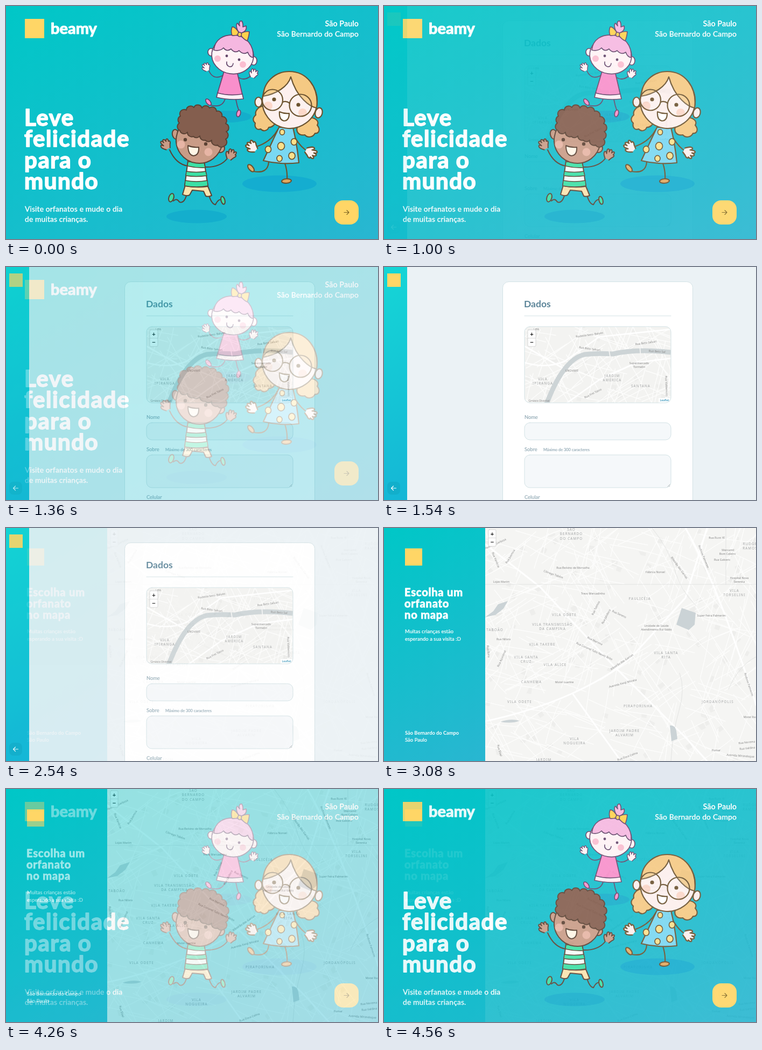
Recreate the animation shown at these times as an HTML page. Size 691x434 px, loop 4.62 s.

```html
<!DOCTYPE html>
<html lang="pt-BR">
<head>
<meta charset="utf-8">
<title>Orfanatos</title>
<style>
html, body { margin: 0; width: 100%; height: 100%; overflow: hidden; background: #14bfcb; }
.scene, .side { position: absolute; top: 0; left: 0; width: 691px; height: 434px; overflow: hidden; }
svg { position: absolute; top: 0; left: 0; fill: none; stroke-linecap: round; stroke-linejoin: round; }
text { font-family: Lato, "Open Sans", sans-serif; stroke: none; white-space: pre; }
.head { font-weight: 700; letter-spacing: .037em; fill: #fff; stroke: #fff; stroke-width: .042em; }
.body { letter-spacing: .012em; fill: #fff; stroke: #fff; stroke-width: .025em; }
.bold { font-weight: 700; fill: #fff; }
.label { fill: #8fa7b3; stroke: #8fa7b3; stroke-width: .15px; }
.road { font: 500 5.3px "Noto Sans", sans-serif; fill: #858585; text-anchor: middle; }
.area { font: 6.3px "Noto Sans", sans-serif; letter-spacing: 1.1px; fill: #a5a7a8; text-anchor: middle; }
.zoom { font: 700 11px "Liberation Sans", sans-serif; fill: #222; text-anchor: middle; }
#home, .wide { background: linear-gradient(329.54deg, #29b6d1 0%, #00c7c7 100%); }
#form { background: #ebf2f5; opacity: 0; }
#map { background: #f5f5f3; opacity: 0; }
.wide { width: 188px; }
.slim { width: 43px; background: linear-gradient(329.54deg, #15b6d6 0%, #15d6d6 100%); }
</style>
</head>
<body>
<div class="scene" id="home"></div>
<div class="scene" id="form"></div>
<div class="scene" id="map"></div>
<script>
const STEP = 60, LOOP = 4620;
const byId = id => document.getElementById(id);
const svg = body => `<svg width="691" height="434" viewBox="0 0 691 434">${body}</svg>`;
const text = (cls, x, y, size, str, extra = '') =>
  `<text class="${cls}" x="${x}" y="${y}" font-size="${size}" ${extra}>${str}</text>`;
const lines = (cls, x, y, size, gap, rows, extra) =>
  rows.map((row, i) => text(cls, x, y + i * gap, size, row, extra)).join('');
const path = (d, fill = 'none', extra = '') => `<path d="${d}" fill="${fill}" ${extra}/>`;
const oval = (x, y, rx, ry, fill, turn = 0, extra = '') =>
  `<ellipse cx="${x}" cy="${y}" rx="${rx}" ry="${ry}" fill="${fill}" transform="rotate(${turn} ${x} ${y})" ${extra}/>`;
const dot = (x, y, r, fill) => oval(x, y, r, r, fill, 0, 'stroke="none"');
const box = (x, y, w, h, rx, fill, extra = '') =>
  `<rect x="${x}" y="${y}" width="${w}" height="${h}" rx="${rx}" fill="${fill}" ${extra}/>`;
const group = (stroke, width, body) => `<g stroke="${stroke}" stroke-width="${width}">${body}</g>`;
const hand = (x, y, turn, scale, fill) => path(
  'M-4 9C-7 6-10 3-10 0C-10-4-7-3-5 0L-7-6C-7-11-3-10-2-5C-3-12 2-12 3-5C5-11 9-9 7-3C10-4 10 0 7 3L4 9', fill,
  `transform="translate(${x} ${y}) rotate(${turn}) scale(${scale})"`);

// Closed outline that bulges outwards between the points of a clockwise list.
const curls = list => {
  const pts = list.split(' ');
  return `M${pts[pts.length - 1]}` + pts.map(p => `A8 8 0 0 1 ${p}`).join('') + 'Z';
};

function randomizer(seed) {
  return (lo, hi) => {
    seed = (seed * 16807) % 2147483647;
    return lo + (hi - lo) * seed / 2147483647;
  };
}

function pinkGirl() {
  const skin = '#fff3f6', blush = '#fbbdd0', ink = '#64466b', hair = '#f5b7e0';
  return oval(411, 206, 45, 11, '#14aecb') + group(ink, 1.7,
    path('M405 128Q386 140 377 121M428 130Q441 142 455 130M407 173Q402 190 381 185M427 174Q429 186 433 196') +
    hand(372, 114, -24, .8, skin) + hand(460, 126, 18, .85, skin) +
    oval(376, 179, 3.6, 7, '#f98fcb', -38) + oval(432, 200, 3.5, 6.5, '#f98fcb', 15) +
    path('M405 122L393 162Q415 169 439 165L429 122Z', '#f98fcb') +
    path('M393 162Q415 168 439 164L441 173Q415 176 391 170Z', '#fff0f6') +
    oval(381, 86, 6, 7, skin) + oval(460, 102, 6, 8, skin) +
    oval(421, 92, 39, 34.5, skin, 8) +
    path('M386 82C388 62 404 53 424 54C447 56 461 74 459 96Q452 95 449 86Q441 92 433 83Q425 89 418 80Q410 86 404 78Q397 85 386 82Z', hair) +
    path('M435 51C427 45 427 33 430 32L434 37C432 30 435 27 438 28Q441 33 440 39L446 37C448 45 442 49 435 51Z', hair) +
    path('M434 52Q426 38 420 39Q417 47 420 55Q427 56 434 52Q446 46 452 48Q451 58 448 65Q441 62 434 52Z', '#ffd24d') +
    oval(434, 53, 3.5, 4, '#ffd24d') +
    dot(393, 98, 6, blush) + dot(440, 109, 6, blush) + dot(410, 93, 2.4, ink) + dot(433, 100, 2.4, ink) +
    path('M410 104Q409 111 415 113Q421 114 422 107'));
}

function blondeGirl() {
  const skin = '#fdf0ee', hair = '#f5c983', blush = '#fbd2c0', ink = '#6b5330', yolk = '#fde08a';
  const spots = [[513, 235, 4.5], [511, 261, 6.5], [535, 253, 5.5], [487, 267, 5.5], [531, 279, 6], [508, 284, 5]];
  return oval(508, 331, 69, 15.5, '#14add0') + group(ink, 2.2,
    path('M505 230Q493 252 468 261M533 237Q541 256 556 268M488 291Q486 313 460 308M518 293Q523 308 522 322') +
    hand(457, 262, -48, 1.1, skin) + hand(566, 273, 118, 1.1, skin) +
    oval(455, 302, 4, 8, '#e6b167', -40) + oval(521, 326, 9, 4, '#e2a85e', -4) +
    path('M507 226Q492 258 478 288Q510 296 544 292Q541 260 533 226Z', '#79d8f2') +
    spots.map(([x, y, r]) => oval(x, y, r, r + .6, yolk, 0, 'stroke-width="1.7"')).join('') +
    path('M478 186C468 188 462 196 464 203C458 208 458 214 463 218C461 226 466 232 473 229C478 235 486 232 488 226Q497 226 501 216L486 196Z', hair) +
    path('M566 208C577 209 582 216 578 222C585 230 581 238 574 237C570 245 560 246 555 240Q545 242 541 234Q538 226 545 222Z', hair) +
    oval(469, 179, 6.5, 9, skin) + oval(581, 199, 6.5, 9.5, skin, 15) +
    oval(527, 177, 51, 51, skin, 8) +
    path('M478 168C478 142 500 122 526 122C558 122 582 150 577 190C566 188 540 172 529 132C524 150 502 164 478 168Z', hair) +
    dot(487, 186, 8, blush) + dot(551, 199, 8, blush) +
    oval(495, 175, 19, 19.5, '#fff2') + oval(547, 185, 20.5, 20.5, '#fff2') + path('M514 179Q520 176 527 181') +
    dot(498, 174, 3.6, ink) + dot(543, 184, 3.6, ink) +
    path('M508 197Q517 201 526 200Q526 214 516 214Q507 212 508 197Z', '#fff'));
}

function boy() {
  const skin = '#c99c87', green = '#3be0a5', ink = '#5b4234';
  const hair = curls('323,232 322,218 324,205 335,194 349,189 364,190 378,190 391,196 401,206 408,219 ' +
    '409,234 408,248 405,261 393,259 382,250 370,250 360,242 348,243 337,235');
  return oval(354, 392, 56, 12.5, '#14aecd') + group(ink, 2,
    path('M338 298Q316 295 304 268M369 300Q398 301 411 284M336 350Q331 369 322 365Q317 357 311 363M377 353Q382 369 389 370Q395 358 401 361') +
    hand(297, 258, -28, 1, skin) + hand(418, 277, 26, 1, skin) +
    oval(307, 357, 4.5, 8, green, 18) + oval(403, 362, 3.5, 7.5, green, -15) +
    path('M333 334L328 351Q335 355 341 352L346 343L367 345L371 354Q376 356 382 353L375 336Z', '#fbe4ae') +
    path('M338 288L332 335Q354 339 375 336L368 288Z', '#f4fff9') +
    path('M338 290L368 292L370 301Q353 302 337 298ZM335 308Q354 311 371 308L373 316Q353 319 334 316ZM333 325Q354 329 374 325L375 335Q354 339 332 335Z', green, 'stroke-width="1.4"') +
    oval(315, 239, 6, 9, skin, -12) + oval(398, 265, 8, 8, skin) +
    oval(359, 250, 43, 43, skin, 8) + path(hair, '#845e4e') +
    dot(325, 258, 7.5, '#e7b5a5') + dot(376, 272, 7.5, '#e7b5a5') +
    dot(333, 249, 3.2, ink) + dot(371, 257, 3.2, ink) +
    path('M338 260Q347 264 358 263Q359 278 348 279Q338 277 338 260Z', '#fff6e6'));
}

const arrow = (x, y, dir, color) => group(color, 1.1,
  path(`M${x - 4.5 * dir} ${y}H${x + 4.5 * dir}M${x + .5 * dir} ${y - 4}L${x + 4.5 * dir} ${y}L${x + .5 * dir} ${y + 4}`));
const zoom = (x, y, w, h) => box(x, y, w, h, 2, '#fff', 'stroke="#ccc" stroke-width=".8"') +
  path(`M${x} ${y + h / 2}h${w}`, 'none', 'stroke="#ccc" stroke-width=".7"') +
  text('zoom', x + w / 2, y + h / 4 + 4, 11, '+') + text('zoom', x + w / 2, y + h * .75 + 4, 11, '−');
const roads = rows => rows.map(([x, y, str, turn = 0]) =>
  text('road', x, y, 5.3, str, `transform="rotate(${turn} ${x} ${y})"`)).join('');
const areas = rows => rows.map(([x, y, str]) => lines('area', x, y, 6.3, 8.4, str.split('|'))).join('');

// Faint blocks and streets, tilted along a few directions.
function streets(seed, count, x0, y0, x1, y1) {
  const rnd = randomizer(seed);
  let blocks = '', ways = '';
  for (let i = 0; i < count; i++) {
    const x = rnd(x0, x1), y = rnd(y0, y1), turn = [-32, 58, 18, -72][i % 4] + rnd(-10, 10);
    const spin = `transform="translate(${x.toFixed(1)} ${y.toFixed(1)}) rotate(${turn.toFixed(1)})"`;
    if (i % 3 === 0) blocks += path(`M0 0h${rnd(5, 15).toFixed(1)}v${rnd(4, 12).toFixed(1)}h-9z`, '#eeeeec', spin);
    ways += path(`M-${rnd(20, 60).toFixed(1)} 0Q0 ${rnd(-5, 5).toFixed(1)} ${rnd(20, 60).toFixed(1)} 0`, 'none', spin);
  }
  return blocks + group('#fdfdfc', 1.4, ways);
}

byId('home').innerHTML = svg(
  box(35, 24, 36, 36, 0, '#ffd666') + text('head', 83, 52, 29, 'beamy', 'style="letter-spacing:0"') +
  text('bold', 655, 38, 14.3, 'São Paulo', 'text-anchor="end"') +
  text('body', 655, 57, 13.9, 'São Bernardo do Campo', 'text-anchor="end"') +
  pinkGirl() + blondeGirl() + boy() +
  lines('head', 34, 223, 42, 39.4, ['Leve', 'felicidade', 'para o', 'mundo']) +
  lines('body', 35, 383, 13.8, 19, ['Visite orfanatos e mude o dia', 'de muitas crianças.']) +
  box(610, 362, 45, 45, 16, '#ffd666') + arrow(632.5, 384.5, 1, '#7d6423'));

const field = (y, h) => box(261, y, 272, h, 10, '#f5f8fa', 'stroke="#d3e2e5"');
const river = 'M300 260Q318 212 335 191Q352 168 372 163Q395 160 425 162Q470 152 533 159';
byId('form').innerHTML = '<div class="side slim"></div>' + svg(
  box(6, 12, 25, 25, 0, '#ffd666') + box(6, 400, 24, 24, 8, '#12afcb') + arrow(18, 412, -1, '#fff') +
  box(220.5, 27.5, 353, 430, 11, '#fff', 'stroke="#d3e2e5"') +
  text('bold', 260, 75, 17.5, 'Dados', 'style="fill:#5c8599"') +
  path('M261 91H533', 'none', 'stroke="#d3e2e5"') +
  '<clipPath id="frame"><rect x="261" y="111" width="272" height="142" rx="10"/></clipPath><g clip-path="url(#frame)">' +
  box(261, 111, 272, 142, 0, '#f3f3f1') + streets(77, 90, 261, 111, 533, 253) +
  group('#fff', 2.6, path('M261 178Q300 190 335 176L400 130L533 116M340 253L400 210L470 178L533 170M262 148L335 190')) +
  path(river, 'none', 'stroke="#cdd4d6" stroke-width="9" stroke-linecap="butt"') +
  group('#f7f7f6', 1.6, path('M417 150L421 172M475 146L477 168')) +
  areas([[295, 211, 'VILA|IPIRANGA'], [424, 205, 'JARDIM|AMÉRICA'], [477, 224, 'SANTANA']]) +
  roads([[283, 118, 'UPA'], [382, 128, 'Rodovia Neto Balvim', -8], [382, 154, 'Rua Beto Salvari', 8],
    [487, 143, 'Rua Beto Salvari', -8], [507, 159, 'Rua Beto Sal', 4], [349, 195, 'UNOVARE'],
    [474, 181, 'Supermercado'], [474, 188, 'Tormelin'], [389, 237, 'Rua Frei Tasco', -27],
    [288, 251, 'Ginásio Distrital'], [523, 222, 'Rua Valdemires', 88]]) +
  box(510, 244, 23, 9, 0, '#fff') + text('road', 521, 250, 5.3, 'Leaflet', 'style="fill:#0078a8"') +
  zoom(267, 117, 15, 31) + '</g>' +
  box(261, 111, 272, 142, 10, 'none', 'stroke="#d3e2e5"') +
  text('label', 261, 283, 9.3, 'Nome') + field(290, 32) +
  text('label', 261, 343, 9.3, 'Sobre') + text('label', 296, 343, 7.4, 'Máximo de 300 caracteres') + field(350, 61) +
  path('M527 409L531 405M530 409L531 408', 'none', 'stroke="#999" stroke-width=".7"') +
  text('label', 261, 432, 9.3, 'Celular'));

const districts = [[348, 5, 'SÃO|BERNARDO|DO CAMPO'], [680, 32, 'RUDGE|RAMOS'], [475, 134, 'PAULICÉIA'], [335, 164, 'VILA ODETE'],
  [313, 182, 'VILA TRANSMISSÃO|DA CAMPINA'], [206, 192, 'TABOÃO'], [294, 219, 'VILA TAKEBE'], [264, 243, 'VILA SANTA|CRUZ'],
  [318, 257, 'VILA ALICE'], [274, 289, 'CANHEMA'], [252, 326, 'VILA ODETE'], [524, 235, 'VILA SANTA|RITA'],
  [472, 334, 'PIRAPORINHA'], [620, 326, 'JORDANÓPOLIS'], [447, 380, 'JARDIM PADRE|ALVARIM'],
  [354, 395, 'VILA|NOGUEIRA'], [297, 434, 'JARDIM'], [651, 119, 'VILA|TORSELINI']];
const places = [[208, 31, 'Avenida Garbosa', -24], [206, 60, 'Rua Vanécia', 68], [236, 54, 'Rua Jusmira', -58],
  [351, 76, 'Rua Belsino de Morvalha'], [314, 88, 'Córrego Tabém', 20], [218, 102, 'Lojas Marim'], [504, 84, 'Fábrica Norvel'],
  [547, 75, 'Ribeirão das Garoas', 54], [592, 54, 'Rodovia Palmerim', 68], [618, 20, 'Rua Ruvo XI'], [639, 43, 'Mercantil'],
  [638, 50, 'Bom Celeiro'], [628, 61, 'Rua Galvero'], [660, 95, 'Hospital Nova'], [660, 102, 'Serenita'], [388, 124, 'Trevo Mercadinho'],
  [395, 150, 'Rua Telmos', -64], [414, 166, 'Rua Jatobira', -62], [436, 162, 'Rua Sereno', 25], [608, 165, 'Super Feira Palmerim'],
  [506, 184, 'Unidade de Saúde'], [506, 191, 'Atendimento Rui Valdo'], [222, 209, 'Rua Nilora'], [391, 212, 'Rua Marvina', 26],
  [390, 231, 'Rua Coronel Tulio Neves Brito', 25], [192, 230, 'Rua Ibira', 84], [220, 244, 'Rua Açucenal', -66],
  [443, 251, 'Ribeirão das Garoas', -34], [335, 289, 'Motel Luarine'], [444, 291, 'Avenida Kenji Morata', -15],
  [676, 292, 'Rodovia Palmerim', 72], [680, 354, 'Motel Ilva'], [453, 427, 'Rua Dora Celina', -20], [213, 415, 'Rua Sivel', 74],
  [617, 416, 'Pomar'], [674, 401, 'Rua Norema', -6], [675, 412, 'Rua Valdina', -6], [662, 426, 'Avenida Mirandoque', 4]];
byId('map').innerHTML = svg(
  streets(4321, 330, 188, 0, 691, 434) +
  group('#fff', 3, path('M188 360Q280 340 350 308T460 240L560 130L600 0M188 30L290 110L420 250L560 390L600 434M350 308L440 434M560 0Q600 70 640 180T691 330')) +
  group('#dedfde', .8, path('M188 105H691M498 0Q530 40 540 78T580 145M549 270Q560 300 548 340T533 434M635 0V105M691 240Q660 255 640 300')) +
  path('M188 166L203 155L212 142L230 136L222 150L207 162ZM553 149L579 158L577 180L566 190L543 180ZM216 361Q236 354 252 359Q238 365 216 361ZM531 368Q540 366 543 378L545 393L534 397Z', '#cbd3d6') +
  areas(districts) + roads(places) + zoom(194, 3, 14, 31)) +
  '<div class="side wide"></div>' + svg(
  box(39, 38, 32, 32, 0, '#ffd666') +
  lines('head', 38, 127, 20.2, 21.2, ['Escolha um', 'orfanato', 'no mapa']) +
  lines('body', 39, 196, 9.3, 14, ['Muitas crianças estão', 'esperando a sua visita :D']) +
  text('bold', 39, 385, 9.3, 'São Bernardo do Campo') + text('body', 39, 398, 9.3, 'São Paulo'));

// Ten held opacity steps; the first one lands right at the start time.
const fade = (start, from, to) => Array.from({ length: 10 }, (_, i) =>
  [start + i * STEP, from + (to - from) * (i + 1) / 10]);
function play(id, steps) {
  const frames = [[0, 0], ...steps, [LOOP, 0]].map(([time, opacity]) =>
    ({ offset: time / LOOP, opacity, easing: 'steps(1, end)' }));
  const anim = byId(id).animate(frames, { duration: LOOP, iterations: Infinity });
  anim.startTime = document.timeline.currentTime;
}
play('form', [...fade(1000, 0, 1), [3080, 0]]);
play('map', [...fade(2540, 0, 1), ...fade(4080, 1, 0).slice(0, 9)]);
</script>
</body>
</html>
```
